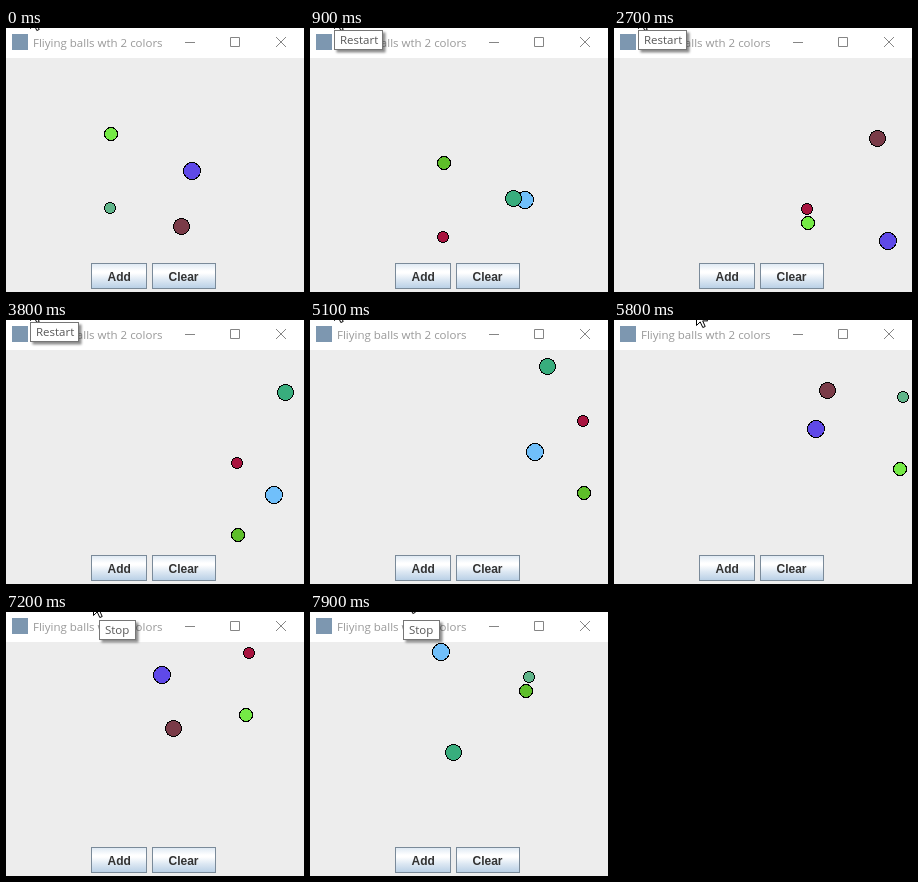
An HTML page for the animation above (8000 ms loop, 298 by 264 pixels).

```html
<!DOCTYPE html>
<html lang="en">
<head>
<meta charset="utf-8">
<title>Flying balls</title>
<style>
  html, body { margin: 0; width: 100%; height: 100%; overflow: hidden; background: #ededed; }
  svg { display: block; }
  .ui { font: 11.5px "Open Sans", "Noto Sans", sans-serif; }
  .title { fill: #999; }
  .tip text { fill: #575757; }
  .button { font: bold 12px "Liberation Sans", Arial, sans-serif; fill: #333; }
  .crisp { shape-rendering: crispEdges; }
</style>
</head>
<body>
<svg width="298" height="264" viewBox="0 0 298 264">
  <defs>
    <linearGradient id="ocean" x2="0" y2="1">
      <stop offset="0" stop-color="#dde8f3"/>
      <stop offset=".3" stop-color="#fff"/>
      <stop offset=".38" stop-color="#fff"/>
      <stop offset=".65" stop-color="#dde8f3"/>
      <stop offset="1" stop-color="#b8cfe5"/>
    </linearGradient>
    <filter id="shadow" x="-20%" y="-20%" width="150%" height="160%">
      <feDropShadow dx="2.5" dy="2.5" stdDeviation="1" flood-color="#000" flood-opacity=".45"/>
    </filter>
  </defs>

  <rect width="298" height="264" fill="#ededed"/>
  <rect width="298" height="30" fill="#fff"/>
  <rect x="6" y="6" width="16" height="16" fill="#7d97b0"/>
  <text class="ui title" x="27" y="19">Fliying balls wth 2 colors</text>
  <g fill="none" stroke="#858585">
    <path d="M179 14.5h10M224.5 9.5h9v9h-9z"/>
    <path d="M270 9l10 10M280 9l-10 10"/>
  </g>

  <g class="button">
    <rect x="85.5" y="235.5" width="55" height="25" fill="url(#ocean)" stroke="#7a8a99"/>
    <text x="101.5" y="253">Add</text>
    <rect x="146.5" y="235.5" width="63" height="25" fill="url(#ocean)" stroke="#7a8a99"/>
    <text x="162.5" y="253">Clear</text>
  </g>

  <g id="balls" class="crisp" stroke="#000"></g>

  <path id="cursor" d="M.5 .5v16l3.7-3.6 2.6 5.6 2.4-1-2.5-5.6h5z" fill="#fff" stroke="#000"/>

  <g id="restart" class="ui tip">
    <rect x="24.5" y="2.5" width="48" height="19" fill="#fff" stroke="#767676" filter="url(#shadow)"/>
    <text x="30" y="16">Restart</text>
  </g>
  <g id="stop" class="ui tip">
    <rect x="93.5" y="8.5" width="36" height="19" fill="#fff" stroke="#767676" filter="url(#shadow)"/>
    <text x="99" y="22">Stop</text>
  </g>
</svg>
<script>
const LOOP = 8000, TICK = 100, BLINK = 50;
const WALLS = { left: 0, right: 299, top: 30, bottom: 231 };

// time, distance travelled along each axis
const travel = [
  [0, 0], [900, 29.2], [1800, 61], [2300, 78.4], [2400, 78.4], [2700, 89],
  [3300, 110], [3800, 127], [4200, 141], [4300, 141], [5100, 169.2],
  [6100, 203.2], [6500, 217.2], [6600, 220.4], [6700, 220.4], [7600, 253.2], [7900, 263.2]
];
// time, x, y of the pointer tip
const pointer = [
  [0, 24, -16], [5300, 24, -16], [5900, 93, -10], [6700, 93, -10],
  [7500, 84, -15], [7600, 84, -16], [7900, 96, -17]
];
const balls = [
  { x: 105, y: 106, size: 14, dy: 1, lag: 0, phase: .13, colors: ['#75ea46', '#5ebe2a'] },
  { x: 186, y: 143, size: 18, dy: 1, lag: .6, phase: .13, colors: ['#5f49e8', '#70bffa'] },
  { x: 175.5, y: 198.5, size: 17, dy: -1, lag: 1, phase: .13, colors: ['#7a3b48', '#38ad7d'] },
  { x: 104, y: 180, size: 12, dy: 1, lag: 0, phase: .31, colors: ['#60b58a', '#a8143f'] }
];

const byId = id => document.getElementById(id);
const mod = (v, n) => ((v % n) + n) % n;

function sample(table, t) {
  const i = table.findIndex(row => row[0] >= t);
  if (i < 0) return table[table.length - 1].slice(1);
  if (i === 0) return table[0].slice(1);
  const a = table[i - 1], b = table[i], k = (t - a[0]) / (b[0] - a[0]);
  return a.slice(1).map((v, j) => v + (b[j + 1] - v) * k);
}

// Reflects a straight path between two walls.
function bounce(v, low, high) {
  const span = high - low, m = mod(v - low, 2 * span);
  return low + (m > span ? 2 * span - m : m);
}

for (const ball of balls) {
  ball.el = document.createElementNS('http://www.w3.org/2000/svg', 'circle');
  ball.el.setAttribute('r', (ball.size - 1) / 2);
  byId('balls').append(ball.el);
}

function show(id, visible) {
  byId(id).style.display = visible ? '' : 'none';
}

function draw(t) {
  const [distance] = sample(travel, t);
  for (const { el, x, y, size, dy, lag, phase, colors } of balls) {
    const d = Math.max(0, Math.round(distance - lag)), half = size / 2;
    el.setAttribute('cx', bounce(x + d, WALLS.left + half, WALLS.right - half));
    el.setAttribute('cy', bounce(y + d * dy, WALLS.top + half, WALLS.bottom - half));
    el.setAttribute('fill', colors[mod(distance / BLINK - phase, 1) < .5 ? 1 : 0]);
  }
  const [px, py] = sample(pointer, t).map(Math.round);
  byId('cursor').setAttribute('transform', `translate(${px} ${py})`);
  show('restart', t >= 100 && t < 5100);
  show('stop', t >= 6400);
}

const start = performance.now();
function frame() {
  const t = (performance.now() - start) % LOOP;
  draw(Math.floor(t / TICK) * TICK);
  requestAnimationFrame(frame);
}
frame();
</script>
</body>
</html>
```
